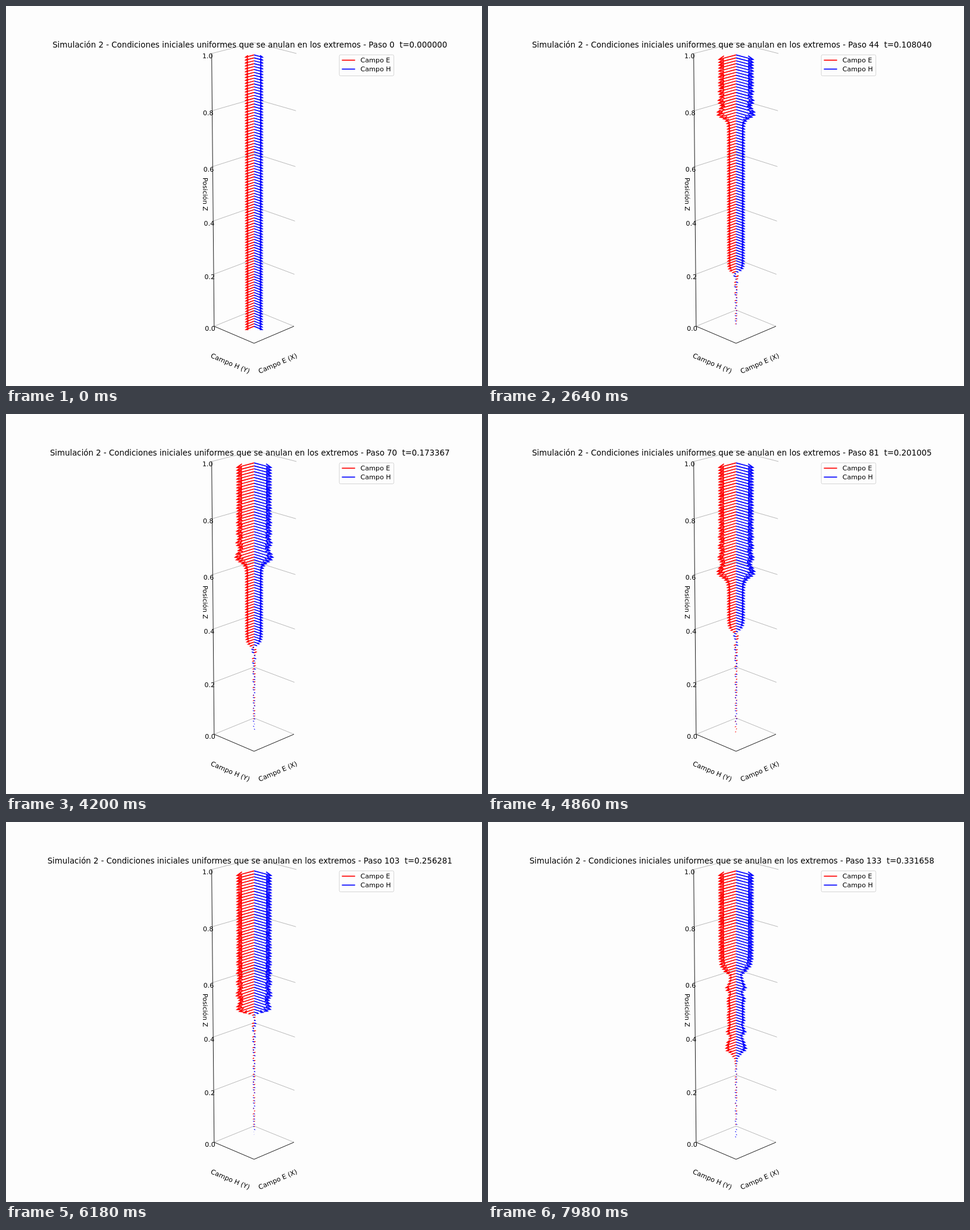
These frames come from a looping animation (800x640 px, 8 s). An HTML page:

```html
<!DOCTYPE html>
<html lang="es">
<head>
<meta charset="utf-8">
<style>
  html, body { margin: 0; width: 100%; height: 100%; overflow: hidden; background: #fdfdfd; }
  svg { display: block; }
  text { font: 11.11px "DejaVu Sans", sans-serif; white-space: pre; }
  .mid { text-anchor: middle; }
  #title { font-size: 13.333px; }
  path { fill: none; }
  #grid { stroke: #b0b0b0; stroke-width: .89; }
  #axes { stroke: #000; stroke-width: .89; }
  .e { stroke: #f00; stroke-width: 1.67; }
  .h { stroke: #00f; stroke-width: 1.67; }
</style>
</head>
<body>
<svg width="800" height="640" viewBox="0 0 800 640">
  <path id="grid"/>
  <path id="axes"/>
  <g id="ticks"></g>
  <text class="mid" transform="translate(334 317) rotate(90)" y="2.9">Posición Z</text>
  <text class="mid" transform="translate(376.7 602.8) rotate(23.1)" y="2.9">Campo H (Y)</text>
  <text class="mid" transform="translate(457.2 602.8) rotate(-23.1)" y="2.9">Campo E (X)</text>
  <path id="fieldE" class="e"/>
  <path id="fieldH" class="h"/>
  <text id="title" class="mid" x="409.8" y="70"></text>
  <rect x="560.2" y="82.2" width="91.6" height="35.4" rx="2.2" fill="#fdfdfd" stroke="#d5d5d5"/>
  <path class="e" d="M564.5 91.3h22.2"/>
  <path class="h" d="M564.5 106.3h22.2"/>
  <text x="595.7" y="95.3">Campo E</text>
  <text x="595.7" y="110.3">Campo H</text>
</svg>
<script>
const CELLS = 200, STEPS = 134, STEP_MS = 60, LOOP_MS = 8000;
const DT = 0.5 / (CELLS - 1), LIMIT = 2.5;
const $ = id => document.getElementById(id);

// Perspective view: azimuth 45°, elevation 20°, tall box
function project(e, h, z) {
  const height = 2 * z - 1;
  const toward = (e + h) * 13.82, side = (h - e) * 13.82;
  const depth = 1 - height * 0.0301 - toward * 3.386e-4;
  return [416.9 + side / depth, 316.6 + (toward * 0.342 - height * 229.5) / depth];
}
const line = (...points) =>
  "M" + points.map(p => project(...p).map(c => c.toFixed(2)).join(" ")).join("L");

function drawBox() {
  const L = LIMIT;
  let grid = "", labels = "";
  for (let i = 0; i <= 5; i++) {
    const z = i / 5, [x, y] = project(L, -L, z);
    grid += line([L, -L, z], [-L, -L, z], [-L, L, z]);
    labels += `<text class="mid" x="${x - 6.8}" y="${y + 8.1}">${z.toFixed(1)}</text>`;
  }
  $("grid").setAttribute("d", grid);
  $("ticks").innerHTML = labels;
  $("axes").setAttribute("d", line([L, -L, 1], [L, -L, 0], [L, L, 0], [-L, L, 0]));
}

// Coupled fields with central differences; both ends are held at zero
function simulate() {
  const E = new Float64Array(CELLS).fill(1), H = E.slice();
  const states = [{ E: E.slice(), H: H.slice() }];
  const advance = (a, b) => {
    for (let i = 1; i < CELLS - 1; i++) a[i] -= 0.5 * (b[i + 1] - b[i - 1]);
  };
  E[0] = H[0] = E[CELLS - 1] = H[CELLS - 1] = 0;
  while (states.length < STEPS) {
    advance(E, H);
    advance(H, E);
    states.push({ E: E.slice(), H: H.slice() });
  }
  return states;
}

// Shaft plus two head strokes opened 15° in the vertical plane
function arrows(field, toPoint) {
  const angle = Math.PI / 12;
  let d = "";
  for (let i = 0; i < CELLS; i += 2) {
    const v = field[i], z = i / (CELLS - 1);
    if (!v) continue;
    const back = v * (1 - 0.3 * Math.cos(angle));
    const rise = v * 0.05 * 0.3 * Math.sin(angle);
    d += line(toPoint(0, z), toPoint(v, z));
    d += line(toPoint(back, z + rise), toPoint(v, z), toPoint(back, z - rise));
  }
  return d;
}

const states = simulate();
let shown = -1;

function render(now) {
  const step = Math.floor((now % LOOP_MS) / STEP_MS);
  if (step !== shown) {
    shown = step;
    const { E, H } = states[step];
    $("fieldE").setAttribute("d", arrows(E, (v, z) => [v, 0, z]));
    $("fieldH").setAttribute("d", arrows(H, (v, z) => [0, v, z]));
    const time = (Math.max(step - 1, 0) * DT).toFixed(6);
    $("title").textContent =
      `Simulación 2 - Condiciones iniciales uniformes que se anulan en los extremos - Paso ${step}  t=${time}`;
  }
}

drawBox();
render(0);
const start = performance.now();
requestAnimationFrame(function tick() {
  render(performance.now() - start);
  requestAnimationFrame(tick);
});
</script>
</body>
</html>
```
